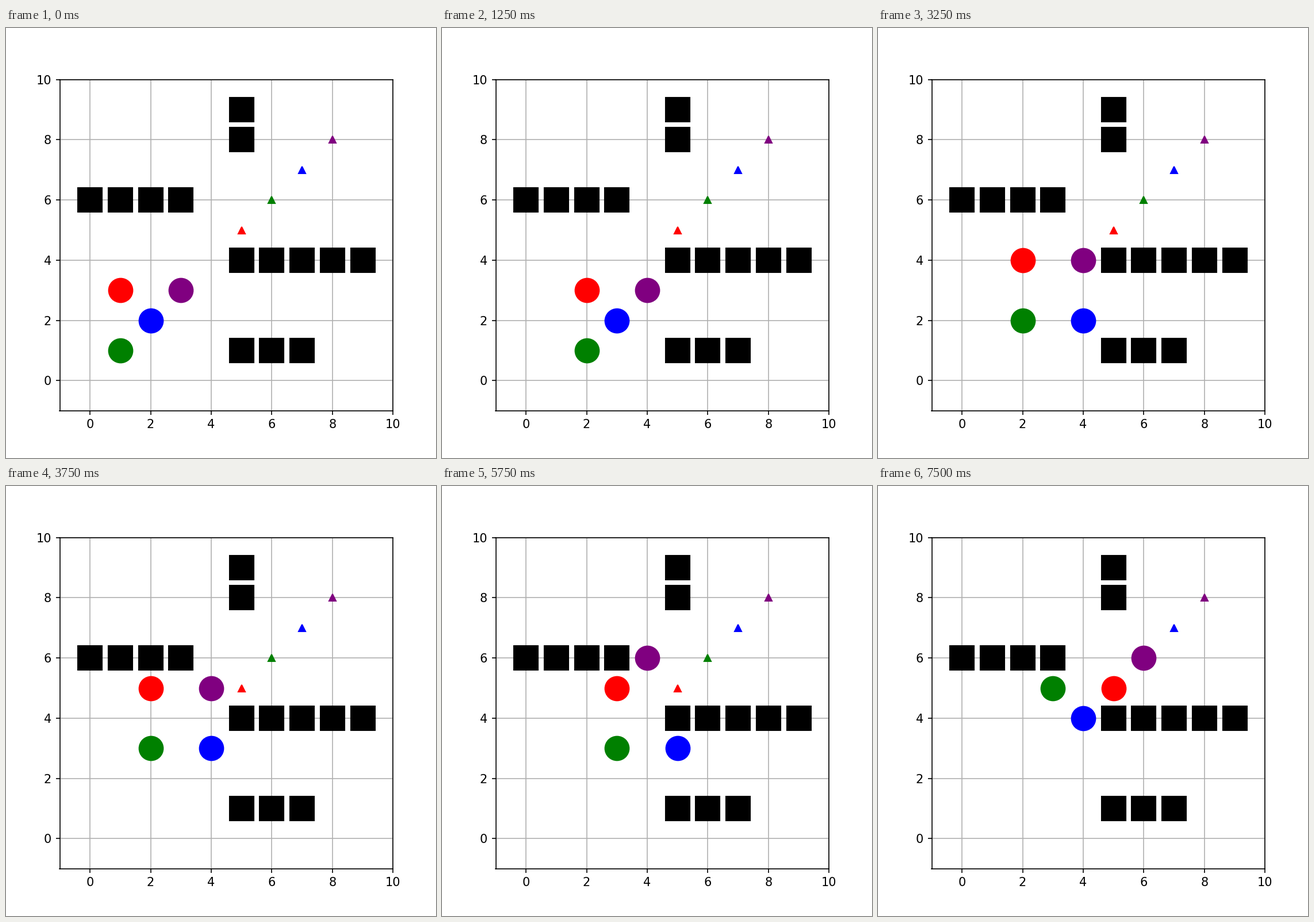
A matplotlib script that plays this animation: 748x748 px, repeating every 8000 ms.

```python
import matplotlib.pyplot as plt
from matplotlib.animation import FuncAnimation

SIZE, DPI = 748, 150
INTERVAL = 250          # ms per frame
FRAMES = 32
HOLD = 5                # frames spent on each grid cell

MOVES = {"R": (1, 0), "L": (-1, 0), "U": (0, 1), "D": (0, -1)}

# colour, start cell, moves, goal cell
ROBOTS = [
    ("red", (1, 3), "RUURRR", (5, 5)),
    ("green", (1, 1), "RUURUU", (6, 6)),
    ("blue", (2, 2), "RRURLU", (7, 7)),
    ("purple", (3, 3), "RUUURR", (8, 8)),
]

WALLS = (
    [(x, 6) for x in range(4)]
    + [(x, 4) for x in range(5, 10)]
    + [(x, 1) for x in range(5, 8)]
    + [(5, y) for y in (8, 9)]
)


def cell_at(start, moves, step):
    x, y = start
    for move in moves[:step]:
        dx, dy = MOVES[move]
        x, y = x + dx, y + dy
    return x, y


fig, ax = plt.subplots(figsize=(SIZE / DPI, SIZE / DPI), dpi=DPI)
ax.set_xlim(-1, 10)
ax.set_ylim(-1, 10)
ax.set_xticks(range(0, 11, 2))
ax.set_yticks(range(0, 11, 2))
ax.grid(True)

for x, y in WALLS:
    ax.plot(x, y, "s", color="black", markersize=20)
for color, _, _, (x, y) in ROBOTS:
    ax.plot(x, y, "^", color=color, markersize=6)
dots = [
    ax.plot(*start, "o", color=color, markersize=20)[0]
    for color, start, _, _ in ROBOTS
]


def update(frame):
    step = frame // HOLD
    for dot, (_, start, moves, _) in zip(dots, ROBOTS):
        x, y = cell_at(start, moves, step)
        dot.set_data([x], [y])
    return dots


anim = FuncAnimation(fig, update, frames=FRAMES, interval=INTERVAL,
                     repeat=True, repeat_delay=0, blit=False)
plt.show()
```
